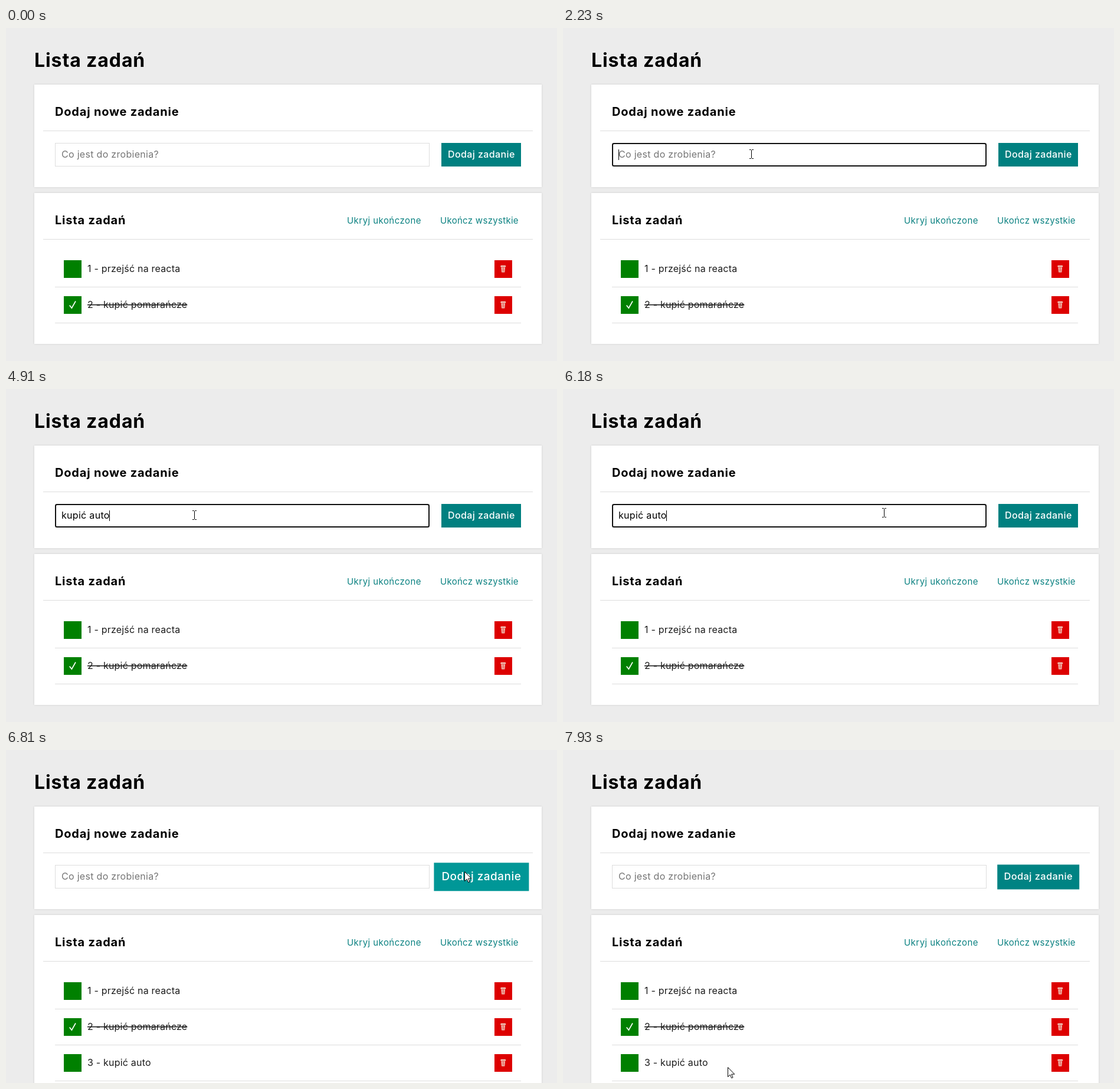
Write an HTML page that moves like this. It is 934 px wide and 565 px high and loops after 8 s.

```html
<!DOCTYPE html>
<html lang="pl">
<head>
<meta charset="utf-8">
<title>Lista zadań</title>
<style>
html, body { margin: 0; width: 100%; height: 100%; overflow: hidden; background: #ececec; }
svg { display: block; width: 934px; height: 565px; }
text { font: 400 16px Inter, "Open Sans", sans-serif; letter-spacing: .3px; white-space: pre; }
.title { font-size: 32px; font-weight: 700; letter-spacing: .9px; }
.head { font-size: 20px; font-weight: 700; letter-spacing: .8px; }
.link { font-size: 15px; fill: #0c8282; }
.hint { fill: #757575; }
.task { fill: #1c1c1c; letter-spacing: .2px; }
.done { text-decoration: line-through; }
.card { fill: #fff; filter: drop-shadow(0 0 1.5px #ccc); }
.line { fill: #ddd; }
#btn { fill: #008080; transform-origin: 805.5px 215px; }
#btn text { fill: #fff; font-weight: 500; letter-spacing: .4px; }
</style>
</head>
<body>
<svg viewBox="0 0 934 565">
  <text class="title" x="48" y="66">Lista zadań</text>

  <rect class="card" x="48" y="96" width="860" height="174"/>
  <text class="head" x="83" y="149">Dodaj nowe zadanie</text>
  <rect class="line" x="63" y="174" width="830" height="1"/>
  <rect x="83.5" y="195.5" width="634" height="39" fill="#fff" stroke="#ddd"/>
  <rect id="ring" x="84" y="196" width="633" height="38" rx="2.5" fill="#fff" stroke="#101010" stroke-width="2"/>
  <text id="hint" class="hint" x="94" y="220">Co jest do zrobienia?</text>
  <text id="typed" x="94" y="220"></text>
  <rect id="caret" y="206" width="1" height="18"/>

  <rect id="list" class="card" x="48" y="280" width="860" height="256"/>
  <text class="head" x="83" y="333">Lista zadań</text>
  <text class="link" x="578" y="332" style="letter-spacing:.45px">Ukryj ukończone</text>
  <text class="link" x="736" y="332">Ukończ wszystkie</text>
  <rect class="line" x="63" y="358" width="830" height="1"/>
  <g id="rows"></g>

  <g id="btn">
    <rect x="738" y="195" width="135" height="40"/>
    <text x="749" y="220">Dodaj zadanie</text>
  </g>

  <g id="cursor">
    <path id="arrow" d="M.5.5V16.5L4.2 13L6.7 18.6L9 17.6L6.6 12.1H11.8Z" fill="#fff" stroke="#000"/>
    <path id="beam" d="M-3 -7.5H-.5L.5 -6.5L1.5 -7.5H4M.5 -6.5V6.5M-3 7.5H-.5L.5 6.5L1.5 7.5H4" fill="none" stroke="#000"/>
  </g>
</svg>
<script>
const LOOP = 8000;
const FOCUS = 1100, TYPE = 2290, KEY = 290, BLINK = 562, PRESS = 6670, ADD = 6740;
const HOVER = 6300, LEAVE = 7500, FADE = 750;
const phrase = 'kupić auto';

const $ = id => document.getElementById(id);
const show = (id, on) => $(id).style.visibility = on ? 'visible' : 'hidden';
const within = (v, a, b) => v >= a && v < b;

// Task rows, 61 px apart
const tasks = ['1 - przejść na reacta', '2 - kupić pomarańcze', '3 - ' + phrase];
const check = '<path d="M107.7 409.5L111.4 414.2L118 402.5" fill="none" stroke="#fff" stroke-width="1.6"/>';
$('rows').innerHTML = tasks.map((task, i) => `
  <g id="row${i}" transform="translate(0 ${i * 61})">
    <rect x="98" y="394" width="30" height="30" fill="#008000"/>
    ${i === 1 ? check : ''}
    <text class="task ${i === 1 ? 'done' : ''}" x="138" y="414">${task}</text>
    <rect x="828" y="394" width="30" height="30" fill="#d00"/>
    <path d="M838.5 403H847V405.5H846L845.3 414.5H840.2L839.5 405.5H838.5Z" fill="#f3dfd0"/>
    <path d="M839.5 405.5H846M841.8 406.5V413.5M843.8 406.5V413.5" stroke="#d00" stroke-width=".8"/>
    <rect class="line" x="83" y="439" width="790" height="1"/>
  </g>`).join('');

// Pointer moves: start and end time, end point, easing
const smooth = k => k * k * (3 - 2 * k);
const slowDown = k => 1 - (1 - k) ** 1.6;
const speedUp = k => k ** 1.6;
const moves = [
  [0, 0, 856, 538, smooth],
  [70, 700, 319, 214, smooth],
  [5840, 6530, 777, 206, smooth],
  [7390, 7570, 660, 334, speedUp],
  [7570, 7930, 279, 538, slowDown]
];

function pointerAt(t) {
  let x = 0, y = 0;
  for (const [from, to, tx, ty, ease] of moves) {
    if (t < from) break;
    const k = t >= to ? 1 : ease((t - from) / (to - from));
    x += (tx - x) * k;
    y += (ty - y) * k;
  }
  return [x, y];
}

// The button grows on hover; the track outlasts the loop so the shrink is cut off
const END = LEAVE + FADE;
const small = { transform: 'scale(1)', fill: '#008080', easing: 'ease' };
const large = { transform: 'scale(1.2)', fill: '#009999', easing: 'ease' };
const grow = $('btn').animate([
  small,
  { ...small, offset: HOVER / END },
  { ...large, offset: (HOVER + FADE) / END },
  { ...large, offset: LEAVE / END },
  small
], { duration: END, fill: 'both' });
grow.pause();

function render(t) {
  grow.currentTime = t;

  const [x, y] = pointerAt(t);
  const overInput = within(x, 83, 718) && within(y, 195, 235);
  $('cursor').setAttribute('transform', `translate(${Math.round(x)} ${Math.round(y)})`);
  show('arrow', t >= 70 && !overInput);
  show('beam', t >= 70 && overInput);

  const added = t >= ADD;
  const keys = Math.min(phrase.length, Math.max(0, Math.floor((t - TYPE) / KEY) + 1));
  const count = added ? 0 : keys;
  const lastInput = keys ? TYPE + (keys - 1) * KEY : FOCUS;
  const focused = within(t, FOCUS, PRESS);
  $('typed').textContent = phrase.slice(0, count);
  $('caret').setAttribute('x', count ? Math.round(93 + $('typed').getComputedTextLength()) : 94);
  show('caret', focused && Math.floor((t - lastInput) / BLINK) % 2 === 0);
  show('ring', focused);
  show('hint', !count);

  show('row2', added);
  $('list').setAttribute('height', added ? 317 : 256);
}

const begin = performance.now();
function tick() {
  render((performance.now() - begin) % LOOP);
  requestAnimationFrame(tick);
}
tick();
</script>
</body>
</html>
```
